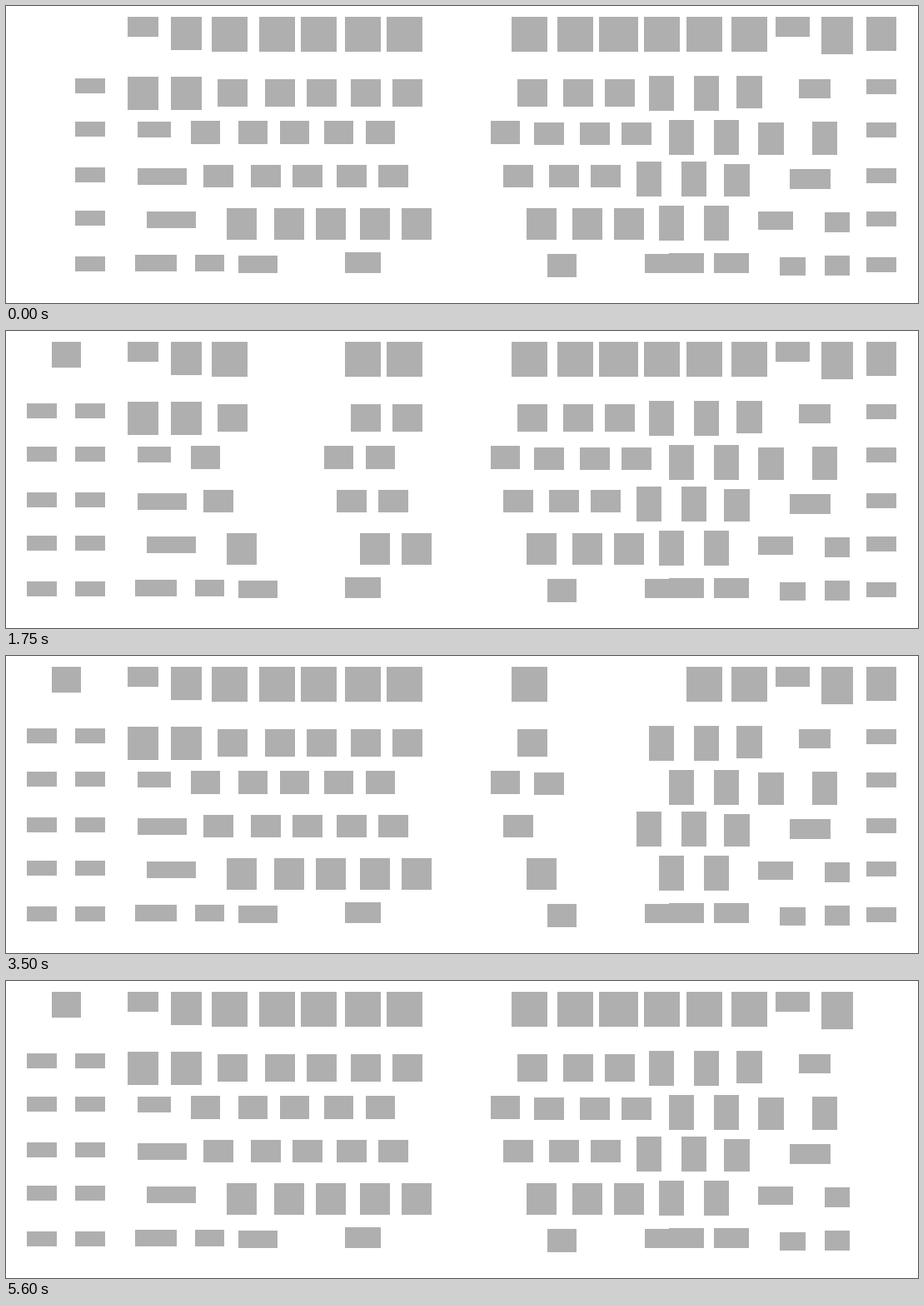
Write an HTML page with a canvas that moves like this. It is 1095 px wide and 357 px high and loops after 5.95 s.

```html
<!DOCTYPE html>
<html lang="en">
<head>
<meta charset="utf-8">
<title>Keyboard columns</title>
<style>
  html, body { margin: 0; width: 100%; height: 100%; overflow: hidden; background: #fff; }
  canvas { display: block; }
</style>
</head>
<body>
<canvas id="stage" width="1095" height="357"></canvas>
<script>
const STEP_MS = 350;
const TOP = 13;
const ctx = document.getElementById('stage').getContext('2d');

const key = (x, y, w, h) => ({ x, y, w, h });

// Equal keys below each other; every odd row is nudged by `zigzag`.
const stack = (xs, y, pitch, zigzag, w, h) =>
  xs.map((x, row) => key(x, y + pitch * row + zigzag * (row % 2), w, h));

const functionKey = x => key(x, TOP, 43, 42);
const sideKeys = (x, y) => stack(Array(5).fill(x), y, 53.5, -1.5, 36, 18);
const innerReach = x => key(x - 25, 138, 35, 28);
const outerReach = x => key(x + 27, 140, 36, 27);

// Finger columns are slanted; x is the left edge of the function key.
const fingerColumn = (x, reach) => [
  functionKey(x), reach(x),
  key(x + 7, 88, 36, 33), key(x - 10, 191, 36, 27), key(x + 18, 243, 36, 38)
];
const leftColumn = x => fingerColumn(x, innerReach);
const rightColumn = x => [...fingerColumn(x, outerReach), functionKey(x + 54)];
const symbolColumn = x => [
  functionKey(x), key(x - 21, 297, 42, 24),
  ...stack([x - 45, x - 21, x - 60, x - 33], 84, 51.5, 1.5, 30, 42)
];

const modifiers = [
  key(146, TOP, 37, 24), key(198, TOP, 37, 40),
  ...[146, 198].map(x => key(x, 85, 37, 40)),
  key(158, 139, 40, 19),
  ...stack([158, 169], 195, 52, 0, 59, 20),
  key(155, 299, 50, 20), key(227, 299, 35, 20)
];
const innerEdge = [
  key(924, TOP, 41, 24),
  ...stack([877, 903, 862], 84, 53, 3, 31, 39),
  key(903, 247, 42, 22), key(929, 302, 31, 22)
];
const outerEdge = [
  key(979, TOP, 38, 45), key(952, 88, 38, 23),
  key(968, 139, 30, 40), key(941, 196, 49, 24),
  ...stack([983, 983], 248, 52, 0, 30, 24)
];

const columns = [
  [key(55, TOP, 35, 31), ...sideKeys(25, 87)],
  sideKeys(83, 87),
  modifiers,
  [...leftColumn(247), key(279, 300, 47, 21)],
  leftColumn(304),
  leftColumn(354),
  [...leftColumn(407), key(407, 296, 43, 25)],
  leftColumn(457),
  [...leftColumn(607), outerReach(607), key(650, 298, 35, 28)],
  rightColumn(662),
  rightColumn(712),
  [...symbolColumn(817), key(767, 298, 42, 23)],
  symbolColumn(871),
  innerEdge,
  outerEdge,
  [key(1033, TOP, 36, 41), ...sideKeys(1033, 88)]
];

// A gap two columns wide sweeps from left to right.
function draw(time) {
  const step = Math.floor(time / STEP_MS) % (columns.length + 1);
  ctx.fillStyle = '#fff';
  ctx.fillRect(0, 0, 1095, 357);
  ctx.fillStyle = '#afafaf';
  columns.forEach((keys, i) => {
    if (i === step || i === step - 1) return;
    keys.forEach(({ x, y, w, h }) => ctx.fillRect(x, y, w, h));
  });
}

function tick() {
  draw(performance.now());
  requestAnimationFrame(tick);
}
tick();
</script>
</body>
</html>
```
